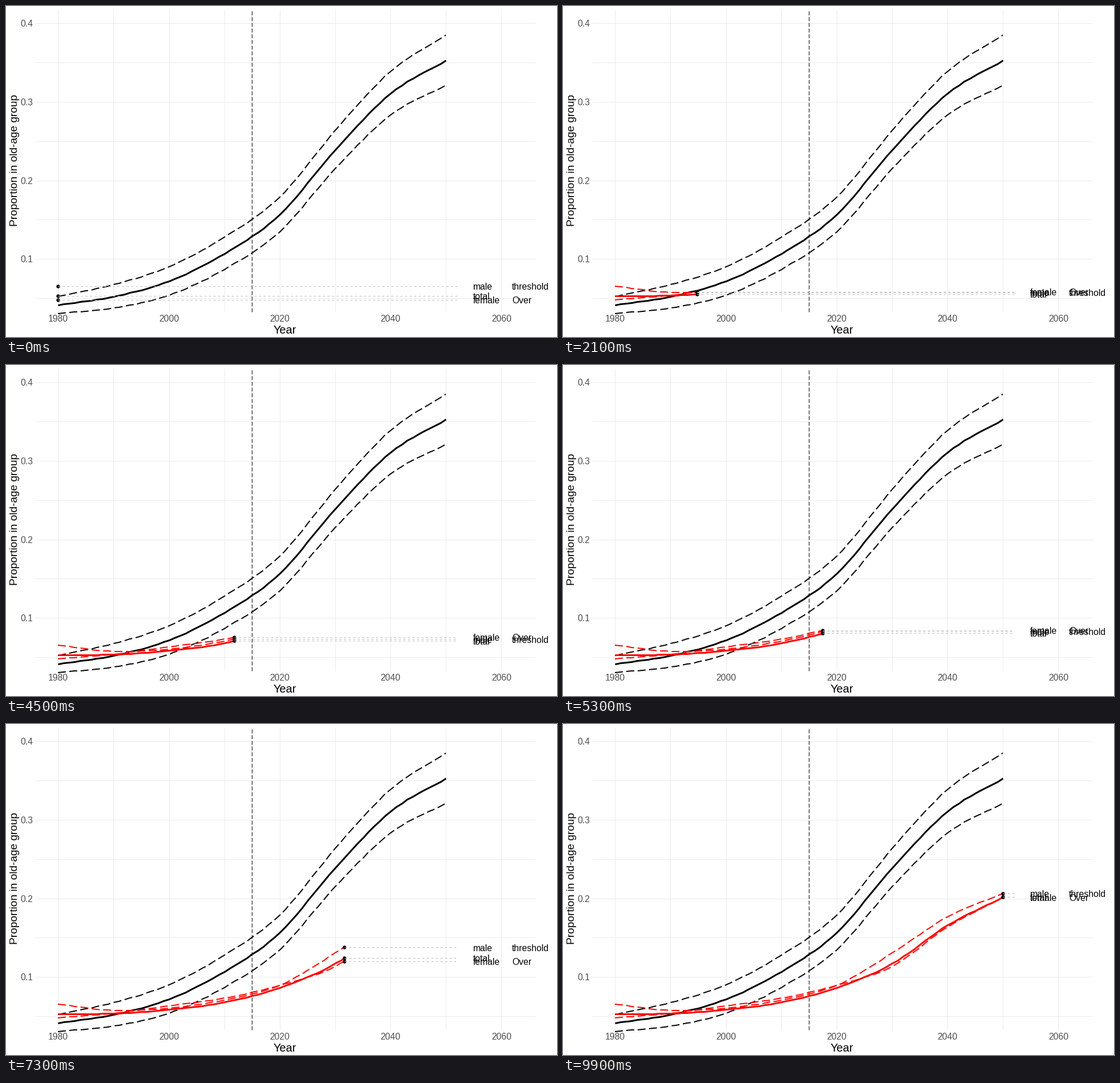
Recreate the animation shown at these times as a matplotlib script. Size 966x580 px, loop 10000 ms.

```python
import numpy as np
import matplotlib.pyplot as plt
from matplotlib.animation import FuncAnimation

W, H, DPI = 966, 580, 100
FRAMES, INTERVAL = 100, 100
START, END = 1980, 2050
PX = 72 / DPI  # points per pixel
LEFT, RIGHT, TOP, BOTTOM = 51, 928, 5, 535
LONG, SHORT = (7, 3), (4, 4)

# One key value per decade
EXPECTED = [.0414, .0522, .0719, .1070, .1568, .2390, .3110, .3530]
REVEALED = {
    "male": [.0653, .0573, .0603, .0706, .0893, .1304, .1765, .2063],
    "total": [.0530, .0537, .0584, .0682, .0864, .1173, .1660, .2018],
    "female": [.0479, .0537, .0631, .0730, .0893, .1133, .1635, .2016],
}
WORDS = {"male": "threshold", "female": "Over"}

plt.rcParams["font.family"] = "Liberation Sans"


def px(year):
    return 91.2 + 9.715 * (np.asarray(year) - START)


def py(value):
    return 29.4 + 1376 * (0.4 - np.asarray(value))


def yearly(knots):
    """Cubic Hermite curve through decade knots, sampled every year."""
    v = np.array(knots)
    m = np.gradient(v)
    t = np.arange(END - START + 1) / 10
    k = np.minimum(t.astype(int), len(v) - 2)
    u = t - k
    return ((2 * u**3 - 3 * u**2 + 1) * v[k] + (u**3 - 2 * u**2 + u) * m[k]
            + (3 * u**2 - 2 * u**3) * v[k + 1] + (u**3 - u**2) * m[k + 1])


fig = plt.figure(figsize=(W / DPI, H / DPI), dpi=DPI, facecolor="white")
ax = fig.add_axes([0, 0, 1, 1])
ax.set_xlim(0, W)
ax.set_ylim(H - 1, -1)
ax.axis("off")


def line(x, y, color, width, dashes=None, z=2):
    # Snapping puts every vertex on the pixel grid
    art, = ax.plot(x, y, color=color, lw=width * PX, snap=True, zorder=z,
                   solid_capstyle="butt", dash_capstyle="butt")
    if dashes:
        art.set_dashes(dashes)
    return art


def text(x, y, s, size=15.8, color="black", **kw):
    return ax.text(x, y, s, fontsize=size * PX, color=color, va="baseline",
                   zorder=6, **kw)


# Grid and axes
for year in range(1980, 2061, 10):
    line([px(year)] * 2, [TOP, BOTTOM], "#ebebeb", 1, z=1)
    if year % 20 == 0:
        text(px(year), 552, str(year), color="#4d4d4d", ha="center")
for i in range(1, 9):
    line([LEFT, RIGHT], [py(i / 20)] * 2, "#ebebeb", 1, z=1)
    if i % 2 == 0:
        text(47, py(i / 20) + 6, f"{i / 20:.1f}", color="#4d4d4d", ha="right")
text(489, 573, "Year", 20, ha="center")
text(20.5, 269, "Proportion in old-age group", 19.2, ha="center",
     rotation=90, rotation_mode="anchor")

# Expected curve inside a slowly widening band
years = np.arange(START, END + 1)
u = (years - START) / (END - START)
band = .0107 + .0212 * u + .0015 * np.sin(2 * np.pi * u)
expected = yearly(EXPECTED)
line(px(years), py(expected), "black", 3)
for side in (-1, 1):
    line(px(years), py(expected + side * band), "black", 2, LONG)
line([px(2015)] * 2, [BOTTOM, TOP], "black", 1, LONG)


class Series:
    """A revealed curve with its end dot, guide line and labels."""

    def __init__(self, name, knots):
        self.values = yearly(knots)
        solid = name == "total"
        self.curve = line([], [], "red", 3 if solid else 2,
                          None if solid else LONG, z=3)
        self.dot, = ax.plot([], [], "o", color="black", ms=6.4 * PX, mew=0,
                            zorder=4)
        self.guide = line([], [], "#bebebe", 1, SHORT, z=5)
        self.labels = [text(px(2055) - 0.8, 0, name)]
        if name in WORDS:
            self.labels.append(text(px(2062) - 0.8, 0, WORDS[name]))

    def show(self, year):
        value = np.interp(year, years, self.values)
        past = years < year
        x, y = px(year), py(value)
        self.curve.set_data(np.append(px(years[past]), x),
                            np.append(py(self.values[past]), y))
        self.dot.set_data([x], [y])
        self.guide.set_data([x, px(2052)], [y, y])
        for label in self.labels:
            label.set_y(y + 6.5)
        return [self.curve, self.dot, self.guide, *self.labels]


series = [Series(name, knots) for name, knots in REVEALED.items()]


def update(i):
    year = START + (END - START) * i / (FRAMES - 1)
    return [art for s in series for art in s.show(year)]


anim = FuncAnimation(fig, update, frames=FRAMES, interval=INTERVAL,
                     repeat=True, repeat_delay=0, blit=False)
plt.show()
```
